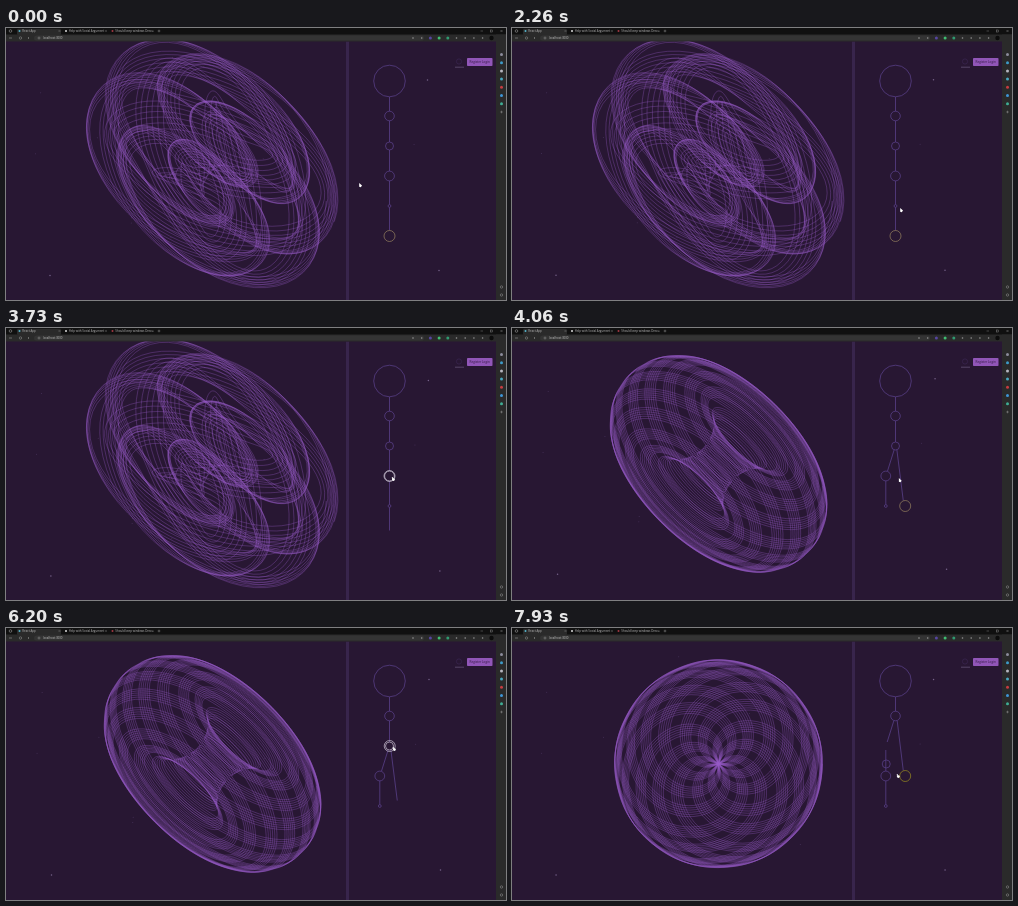
These frames come from a looping animation (500x272 px, 8000 ms). An HTML page with a canvas:

```html
<!DOCTYPE html>
<html lang="en">
<head>
<meta charset="utf-8">
<title>Spirograph editor</title>
<style>
  html, body { margin: 0; width: 500px; height: 272px; overflow: hidden; background: #281733; }
  canvas { display: block; }
</style>
</head>
<body>
<canvas id="stage" width="500" height="272"></canvas>
<script>
const ctx = document.getElementById('stage').getContext('2d');
const LOOP = 8000, TAU = Math.PI * 2;
const PURPLE = '#5a418a', WHITE = '#c3bacb', SOFT = '#969696';
const AXIS = 383.5, SPREAD = 9.7;
const rowY = row => 88 + 30 * row;

// The leaf is tugged once, then dropped on two other joints.
const drags = [[800, 1500], [2850, 3950], [5650, 6250]];
const JOINT_GRAB = 7650;
const stageAt = t => (t >= drags[1][1]) + (t >= drags[2][1]);

// Resting places of the pointer: [time, x, y].
const stops = [
  [60, 354, 157], [650, 387, 204], [800, 387, 204], [1200, 394, 196], [2260, 389, 182],
  [2850, 387, 211], [3600, 387, 151], [3950, 387, 151], [4700, 398, 169], [5460, 398, 169],
  [5650, 397.5, 181], [6150, 388, 121], [7000, 388, 121], [JOINT_GRAB, 385.5, 130], [LOOP, 386, 150]
];

function mouseAt(t) {
  const i = stops.findIndex(stop => stop[0] > t);
  if (i < 1) return { x: stops[0][1], y: stops[0][2] };
  const [t0, x0, y0] = stops[i - 1], [t1, x1, y1] = stops[i];
  const u = (t - t0) / (t1 - t0), k = u * u * (3 - 2 * u);
  return { x: x0 + (x1 - x0) * k, y: y0 + (y1 - y0) * k };
}

function dragged(home, grab, t) {
  const a = mouseAt(grab), b = mouseAt(t);
  return { x: home.x + b.x - a.x, y: home.y + b.y - a.y };
}

// Each arm is [length, speed, phase]; the pen sits at the end of their sum.
function spirograph(laps, arms) {
  const path = new Path2D();
  for (let i = 0; i <= laps * 120; i++) {
    const a = i / 120 * TAU;
    let x = 206.5, y = 135.8;
    for (const [length, speed, phase = 0] of arms) {
      x += length * Math.cos(a * speed + phase);
      y += length * Math.sin(a * speed + phase);
    }
    path.lineTo(x, y);
  }
  return path;
}

const SPEED = 1 + 9 / 7 + 0.0022;
const arms = [[52, 1], [52, SPEED], [22, -SPEED, Math.PI / 2], [18, 3.713, 1]];
const drawings = [
  spirograph(42, arms),
  spirograph(42, arms.slice(0, 3)),
  spirograph(42, arms.slice(0, 2))
];

function rect(x, y, w, h, color, radius = 0) {
  ctx.fillStyle = color;
  ctx.beginPath();
  ctx.roundRect(x, y, w, h, radius);
  ctx.fill();
}

function dot(x, y, r, color) {
  ctx.fillStyle = color;
  ctx.beginPath();
  ctx.arc(x, y, r, 0, TAU);
  ctx.fill();
}

function ring(x, y, r, color = PURPLE, width = 0.75) {
  ctx.strokeStyle = color;
  ctx.lineWidth = width;
  ctx.beginPath();
  ctx.arc(x, y, r, 0, TAU);
  ctx.stroke();
}

function line(x0, y0, x1, y1, color = PURPLE, width = 0.8) {
  ctx.strokeStyle = color;
  ctx.lineWidth = width;
  ctx.beginPath();
  ctx.moveTo(x0, y0);
  ctx.lineTo(x1, y1);
  ctx.stroke();
}

function label(text, x, y, color, size = 2.9) {
  ctx.font = `${size}px "Open Sans", sans-serif`;
  ctx.fillStyle = color;
  ctx.fillText(text, x, y);
}

function cross(x, y, r) {
  line(x - r, y - r, x + r, y + r, SOFT, 0.4);
  line(x - r, y + r, x + r, y - r, SOFT, 0.4);
}

function plus(x, y) {
  line(x - 1.3, y, x + 1.3, y, SOFT, 0.5);
  line(x, y - 1.3, x, y + 1.3, SOFT, 0.5);
}

function drawTab(x, title, color) {
  dot(x, 3, 1, color);
  label(title, x + 2.8, 4.1, '#b8b8b8');
  cross(x + 40, 3, 0.7);
}

function drawBrowser() {
  rect(0, 0, 500, 7, '#101010');
  rect(0, 6.5, 500, 7, '#2a2a2a');
  rect(490, 6.5, 10, 266, '#2a2a2a');
  rect(11, 0.8, 44, 6.5, '#2a2a2a', 1.5);
  ring(4.5, 3, 1.3, SOFT, 0.6);
  drawTab(13.5, 'React App', '#55b5cc');
  drawTab(60, 'Help with Social Argument', '#d8d8d8');
  drawTab(106.5, 'Should keep windows Desc…', '#a33843');
  plus(153, 3);
  line(474.5, 3, 477, 3, SOFT, 0.4);
  ctx.strokeRect(484.5, 2, 2, 2);
  cross(495.5, 3, 1);

  line(3, 10, 6, 10, SOFT, 0.6);
  ring(14.5, 10, 1.2, SOFT, 0.5);
  line(22.5, 11, 22.5, 9, SOFT, 0.6);
  rect(28, 7.6, 390, 5, '#343434', 2.5);
  ring(33, 10, 1, SOFT, 0.5);
  label('localhost:3000', 37, 11.1, '#c4c4c4');
  const extensions = [SOFT, SOFT, '#5645a0', '#3fbd70', '#2f9a70', SOFT, SOFT, SOFT, SOFT];
  extensions.forEach((color, i) => dot(407 + i * 8.7, 10, color === SOFT ? 0.8 : 1.5, color));
  dot(485.5, 10, 2.2, '#0c0c0c');

  const apps = ['#8c8c9c', '#3d9bc8', '#b6b6c0', '#48a8c0', '#c63c40', '#3e96d8', '#3fae94'];
  apps.forEach((color, i) => dot(495.5, 26.5 + i * 8.2, 1.5, color));
  plus(495.5, 84);
  ring(495.5, 259, 1.2, SOFT, 0.5);
  ring(495.5, 267, 1.2, SOFT, 0.5);
}

let seed = 11;
const random = () => (seed = seed * 16807 % 2147483647) / 2147483647;
const bright = [[44.5, 247], [433.5, 242], [422, 51.5]];
const faint = Array.from({ length: 14 }, () => [30 + random() * 440, 18 + random() * 240]);

function drawStars(t) {
  const a = t / LOOP * TAU * 7;
  const dx = 0.8 * (1 - Math.cos(a)) - 0.5, dy = 1.2 * Math.sin(a + 0.4);
  for (const [x, y] of bright) dot(x + dx, y + dy, 0.75, '#76628a');
  for (const [x, y] of faint) dot(x + dx, y + dy, 0.5, '#463259');
}

function drawTree(t) {
  const stage = stageAt(t), mouse = mouseAt(t);
  const holdsJoint = t >= JOINT_GRAB;
  const drag = drags.find(([grab, drop]) => t >= grab && t < drop);
  const near = (p, r) => !holdsJoint && Math.hypot(mouse.x - p.x, mouse.y - p.y) < r;

  const fork = 3 - stage;
  const left = row => ({ x: stage && row > fork - 1 ? AXIS - SPREAD : AXIS, y: rowY(row) });
  const nodes = [0, 1, 2, 3].map(left);
  const radii = [4.8, 4, 4.9, 1.4];
  const leafHome = { x: stage ? AXIS + SPREAD : AXIS, y: rowY(4 - stage) };
  const leaf = drag ? dragged(leafHome, drag[0], t) : leafHome;

  const link = (a, b, ra, rb) => {
    const slant = Math.sign(b.x - a.x);
    line(a.x + slant * ra * 0.35, a.y + ra, b.x - slant * rb * 0.35, b.y - rb);
  };
  ring(AXIS, 53, 15.8);
  line(AXIS, 69, AXIS, rowY(0) - radii[0]);
  for (let i = 0; i < 3; i++) link(nodes[i], nodes[i + 1], radii[i], radii[i + 1]);
  const parent = stage ? fork - 1 : 3;
  link(nodes[parent], leafHome, radii[parent], 5.5);

  if (holdsJoint) nodes[1] = dragged(nodes[1], JOINT_GRAB, t);
  let hand = Boolean(drag) || holdsJoint;
  nodes.forEach((node, i) => {
    const hot = i < 3 && near(node, 6);
    hand ||= hot;
    ring(node.x, node.y, radii[i], hot ? WHITE : PURPLE);
  });
  const leafHot = Boolean(drag) || near(leaf, 11);
  ring(leaf.x, leaf.y, 5.5, leafHot ? WHITE : stage === 2 ? '#938620' : '#8f7b5d');
  drawCursor(mouse, hand || leafHot);
}

function drawCursor({ x, y }, hand) {
  if (hand) {
    dot(x + 0.4, y + 0.6, 1.4, '#fff');
    line(x - 0.5, y, x - 0.7, y - 2, '#fff', 0.9);
    return;
  }
  ctx.fillStyle = '#fff';
  ctx.beginPath();
  ctx.moveTo(x - 0.8, y - 2);
  ctx.lineTo(x - 0.8, y + 1.8);
  ctx.lineTo(x + 0.8, y + 2.2);
  ctx.lineTo(x + 2, y + 0.6);
  ctx.fill();
}

function draw(now) {
  const t = now % LOOP;
  rect(0, 0, 500, 272, '#281733');
  drawStars(t);

  ctx.strokeStyle = 'rgba(153, 92, 200, 0.66)';
  ctx.lineWidth = 0.5;
  ctx.stroke(drawings[stageAt(t)]);

  rect(340, 13.5, 3, 259, '#38254c');
  ring(453, 33.5, 2.6, '#3d2956', 0.6);
  line(449, 39.2, 458, 39.2, '#75648a', 0.6);
  rect(461, 30, 25.5, 8, '#9156b8', 0.8);
  label('Register Login', 463.5, 35.2, '#331b42', 3.1);

  drawBrowser();
  drawTree(t);
  requestAnimationFrame(draw);
}
requestAnimationFrame(draw);
</script>
</body>
</html>
```
